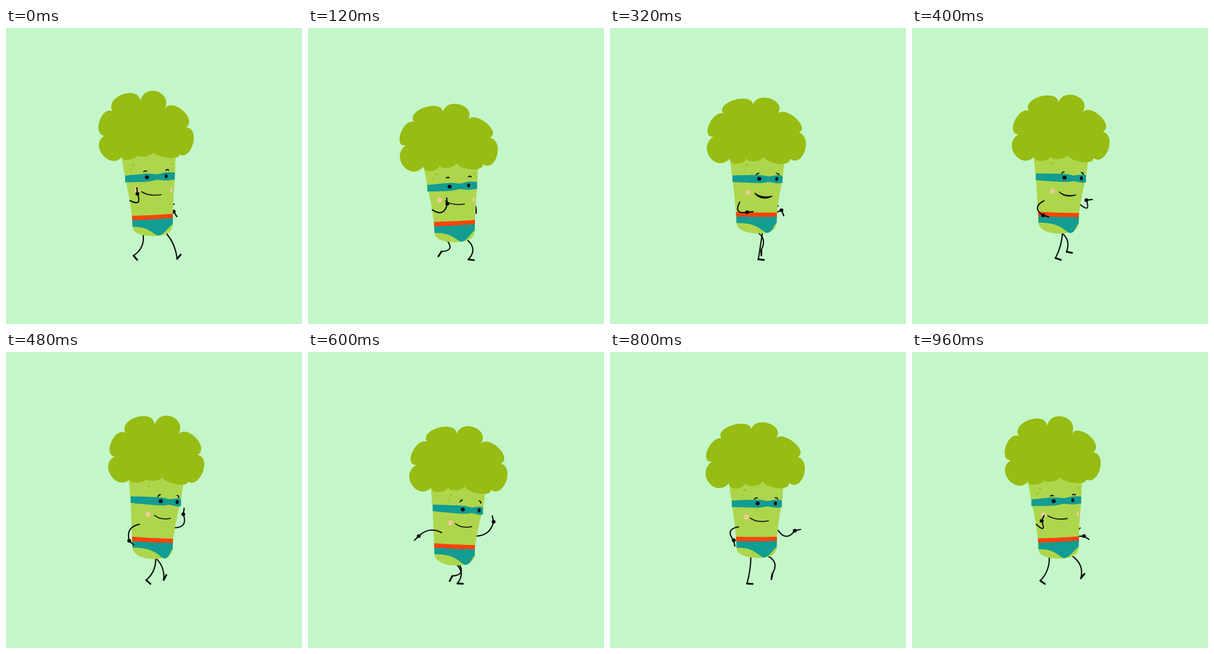
Animation, 500 px wide and 500 px high, one loop 1 s. Source, as an HTML page with a canvas:

```html
<!DOCTYPE html>
<html lang="en">
<head>
<meta charset="utf-8">
<title>Walking broccoli</title>
<style>
html, body { margin: 0; width: 100%; height: 100%; overflow: hidden; background: #c3f7c9; }
canvas { display: block; width: 100vw; height: 100vh; }
</style>
</head>
<body>
<canvas id="stage"></canvas>
<script>
const LOOP = 1000, STEP = 40, SIZE = 500, TAU = Math.PI * 2;
const C = {
  bg: '#c3f7c9', head: '#97bc13', body: '#add64c', teal: '#129c92',
  red: '#fa430c', ink: '#0b0c08', cheek: '#f3c89b'
};

// one step, two per loop: phase, head y, waist y, squash
const BOB = [
  [0, 164, 315.5, 0],
  [.22, 184.5, 325.3, .028],
  [.32, 189.5, 326, .05],
  [.62, 176, 311.5, .04],
  [.94, 166, 313.3, .006]
];
// one stride, shared by both legs: phase, heel x, heel y, foot angle
const FOOT = [
  [0, 27, 390, -50],
  [.11, 10, 391, 5],
  [.31, -10.5, 391, 5],
  [.49, -25.5, 385, 45],
  [.61, -17, 378, 120],
  [.81, 13.5, 374.5, 95],
  [.97, 24, 383, -60]
];
// one swing, shared by both arms: phase, hand x, hand y, finger angle
const HAND = [
  [0, 222, 280, -95],
  [.11, 235, 296, -100],
  [.31, 232.5, 310.5, -8],
  [.475, 209, 319, 40],
  [.6, 187, 311, 135],
  [.8, 209, 318, 80]
];
// corners of the crown and the bulge of the lobe that follows each
const LOBES = [
  [179, 141, 28], [226, 123, 32], [267, 137, 24], [304, 168, 24], [293, 214, 11],
  [250, 207, 9], [222, 213, 9], [196, 218, 30], [166, 182, 21]
];

// periodic cubic interpolation of rows that start with their phase
function track(rows, phase) {
  const n = rows.length, p = phase - Math.floor(phase);
  const row = i => rows[(i + n) % n];
  const at = i => row(i)[0] + Math.floor(i / n);
  let i = n - 1;
  while (rows[i][0] > p) i--;
  const d = at(i + 1) - at(i), u = (p - at(i)) / d, u2 = u * u, u3 = u2 * u;
  return row(i).map((a, j) => {
    const b = row(i + 1)[j];
    const va = (b - row(i - 1)[j]) / (at(i + 1) - at(i - 1)) * d;
    const vb = (row(i + 2)[j] - a) / (at(i + 2) - at(i)) * d;
    return a * (2 * u3 - 3 * u2 + 1) + b * (3 * u2 - 2 * u3) +
      va * (u3 - 2 * u2 + u) + vb * (u3 - u2);
  }).slice(1);
}

const canvas = document.getElementById('stage');
const g = canvas.getContext('2d');

function fill(color, path) {
  g.fillStyle = color;
  g.fill(path);
}

function line(path, width) {
  g.strokeStyle = C.ink;
  g.lineWidth = width;
  g.stroke(path);
}

function oval(color, x, y, rx, ry) {
  const p = new Path2D();
  p.ellipse(x, y, Math.max(rx, 0), ry, 0, 0, TAU);
  fill(color, p);
}

// adds a smooth curve through the points to a path
function curve(p, pts) {
  for (let i = 0; i < pts.length - 1; i++) {
    const a = pts[i], b = pts[i + 1];
    const o = pts[i - 1] || a, c = pts[i + 2] || b;
    p.bezierCurveTo(
      a[0] + (b[0] - o[0]) / 6, a[1] + (b[1] - o[1]) / 6,
      b[0] - (c[0] - a[0]) / 6, b[1] - (c[1] - a[1]) / 6, b[0], b[1]);
  }
}

// two soft bones from root to end, bent to one side, then a straight tip
function limb(x, y, ex, ey, bone, side, angle, tipLen, tipWidth) {
  const dx = ex - x, dy = ey - y, dist = Math.hypot(dx, dy);
  const bend = side * Math.sqrt(Math.max(0, bone * bone - dist * dist / 4)) / dist;
  const p = new Path2D(), tip = new Path2D(), a = angle * TAU / 360;
  p.moveTo(x, y);
  p.quadraticCurveTo(x + dx / 2 + dy * bend, y + dy / 2 - dx * bend, ex, ey);
  line(p, 2.1);
  tip.moveTo(ex, ey);
  tip.lineTo(ex + tipLen * Math.cos(a), ey + tipLen * Math.sin(a));
  line(tip, tipWidth);
}

function leg(baseX, hipY, phase) {
  const [x, y, angle] = track(FOOT, phase);
  const hipX = baseX + 9.5 * Math.cos(phase * TAU);
  limb(hipX, hipY, baseX + x, y, 24, 1, angle, 9.5, 3);
}

function arm(x, y, phase, offX, offY) {
  const [hx, hy, angle] = track(HAND, phase);
  limb(x, y, hx + offX, hy + offY, 24, -1, angle, 10, 2.2);
  oval(C.ink, hx + offX, hy + offY, 3.3, 3.1);
}

function torso({ turn, waist, maskY, l, r, crotch }) {
  const wl = waist - 1.8 * turn, wr = waist + 1.8 * turn;
  const base = waist + 36;
  const body = new Path2D();
  body.moveTo(199 + 7.5 * turn, maskY - 52);
  body.lineTo(l, maskY);
  body.quadraticCurveTo(212, wl - 18, 213.5, wl + 17);
  body.bezierCurveTo(213, wl + 30, 230, base, 250, base);
  body.bezierCurveTo(268, base, 281, base - 5, 281.5, wr + 18);
  body.quadraticCurveTo(281.5, wr - 10, r, maskY);
  body.lineTo(295 + 8 * turn, maskY - 52);
  body.closePath();
  fill(C.body, body);

  const pants = new Path2D();
  pants.moveTo(213.5, wl + 5);
  pants.lineTo(282, wr + 5);
  pants.lineTo(281.5, wr + 18);
  pants.bezierCurveTo(276, wr + 20, crotch + 10, base - 1, crotch, base - 1);
  pants.bezierCurveTo(crotch - 9, base - 3, crotch - 14, wl + 18, 213.5, wl + 18.5);
  pants.closePath();
  fill(C.teal, pants);

  const band = new Path2D();
  band.moveTo(213, wl);
  band.quadraticCurveTo(247, waist + 1.2, 282, wr);
  band.lineTo(282, wr + 7);
  band.quadraticCurveTo(247, waist + 8.5, 213, wl + 7.5);
  band.closePath();
  fill(C.red, band);
  return body;
}

function spots({ turn, maskY }, body) {
  const fx = 228.5 + 14 * turn, fy = maskY - 23 - 2 * turn, gx = 296 + 16 * turn;
  g.save();
  g.clip(body);
  oval(C.cheek, 231 + 10 * turn, maskY + 22.5, 4, 4.2);
  oval(C.cheek, 287 + 8 * turn, maskY + 21.5, 1.2 - turn, 4);
  oval(C.head, fx, fy, 1.6, 1.7);
  oval(C.head, fx - 4, fy + 8, 1.3, 1.3);
  oval(C.head, gx, maskY - 23, 1.2, 1.7);
  oval(C.head, gx + 2, maskY - 16, 1, 1.2);
  g.restore();
}

function brow(x, y, angle) {
  g.save();
  g.translate(x, y);
  g.rotate(angle);
  line(new Path2D('M-2.5 .8Q0 -1.4 2.5 .6'), 1.8);
  g.restore();
}

function face({ turn, waist, maskY, l, r }) {
  const lineY = x => maskY + 5.5 * turn * ((x - l) / (r - l) - .5);
  const ax = 250 + 12.3 * turn, bx = 280 + 9.8 * turn;
  const spine = [[l, 5.6], [ax, 6.8], [(ax + bx) / 2 + 1, 4.8], [bx, 6.8], [r, 5.8]];
  const top = spine.map(([x, h]) => [x, lineY(x) - h]);
  const low = spine.map(([x, h]) => [x, lineY(x) + h]).reverse();
  const p = new Path2D();
  p.moveTo(...top[0]);
  curve(p, top);
  p.lineTo(...low[0]);
  curve(p, low);
  p.closePath();
  fill(C.teal, p);

  oval(C.ink, ax, lineY(ax) - .5, 3.4, 3.3);
  oval(C.ink, bx, lineY(bx) - .5, 2.5, 3.3);
  const lift = 10 + .45 * (waist - 313);
  brow(ax - 3, lineY(ax) - lift, -.35 * (1 + turn));
  brow(bx + 2, lineY(bx) - lift, .5 * (1 + turn));
}

function mouth(t, maskY) {
  const s = -Math.cos(t * TAU);
  const x = 240 + 11 * s, y = maskY + 24, w = 30 - 3 * s;
  const open = 5 * Math.max(0, Math.cos((t - .32) * TAU)) ** 6;
  const p = new Path2D();
  p.moveTo(x, y);
  p.quadraticCurveTo(x + w * .38, y + 8.5, x + w, y + 5);
  p.quadraticCurveTo(x + w * .4, y + 8.5 + open, x, y);
  fill(C.ink, p);
  line(p, 1.6);
}

function crown({ turn, headY, squash }) {
  const lift = 160 * squash, p = new Path2D();
  g.save();
  g.transform(1 + squash, .042 + .044 * turn, -.07 - .055 * turn, 1 - .75 * squash,
    246.5 + 10.3 * turn, headY);
  g.translate(-236, -164);
  p.moveTo(LOBES[0][0], LOBES[0][1] - lift);
  LOBES.forEach(([x, y, h], i) => {
    const [ex, ey] = LOBES[(i + 1) % LOBES.length];
    const dx = ex - x, dy = ey - y, len = Math.hypot(dx, dy);
    const nx = dy / len * h, ny = -dx / len * h;
    p.bezierCurveTo(x + nx - dx * .1, y + ny - dy * .1,
      ex + nx + dx * .1, ey + ny + dy * .1, ex, ey - lift);
  });
  fill(C.head, p);
  g.restore();
}

// t runs from 0 to 1 over the loop
function draw(t) {
  g.setTransform(canvas.width / SIZE, 0, 0, canvas.height / SIZE, 0, 0);
  g.lineCap = g.lineJoin = 'round';
  g.fillStyle = C.bg;
  g.fillRect(0, 0, SIZE, SIZE);

  const [headY, waist, squash] = track(BOB, t * 2);
  const turn = -Math.cos((t - .042) * TAU);
  const pose = {
    turn, headY, waist, squash,
    maskY: 252.5 + .45 * (headY - 164) + .55 * (waist - 315.5),
    l: 206 + 5 * turn,
    r: 290.5 + 5.5 * turn,
    crotch: 262 - 5.5 * Math.cos((t + .03) * TAU)
  };

  leg(241, waist + 32, t + .5);
  leg(262, waist + 32, t);
  arm(284, pose.maskY + 45, t + .5, 79, -8);
  const body = torso(pose);
  spots(pose, body);
  face(pose);
  mouth(t, pose.maskY);
  crown(pose);
  arm(217.5 + 8.5 * turn, pose.maskY + 39, t, 0, 0);
}

function resize() {
  const dpr = window.devicePixelRatio || 1;
  canvas.width = Math.round(innerWidth * dpr);
  canvas.height = Math.round(innerHeight * dpr);
}

function tick() {
  draw(Math.floor(performance.now() % LOOP / STEP) * STEP / LOOP);
  requestAnimationFrame(tick);
}

addEventListener('resize', resize);
resize();
tick();
</script>
</body>
</html>
```
